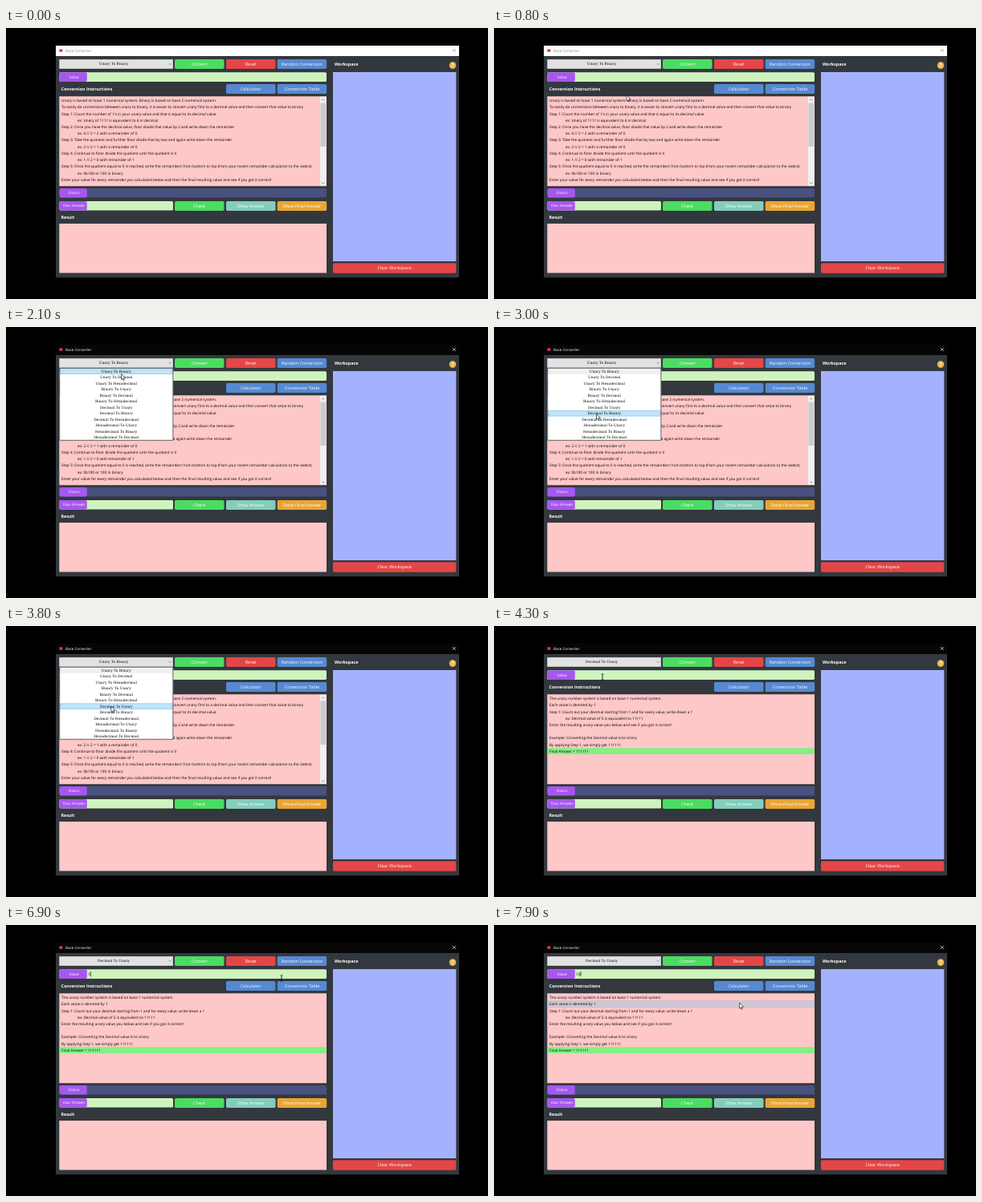
An HTML page with a canvas for the animation above (8000 ms loop, 600x338 px).

```html
<!DOCTYPE html>
<html lang="en">
<head>
<meta charset="utf-8">
<title>Base Converter</title>
<style>
html, body { margin: 0; width: 100%; height: 100%; overflow: hidden; background: #000; }
canvas { display: block; width: 600px; height: 338px; }
</style>
</head>
<body>
<canvas id="stage" width="600" height="338"></canvas>
<script>
const ctx = document.getElementById('stage').getContext('2d');
const LOOP = 8000, STEP = 100;
const SANS = '"Open Sans", "Noto Sans", sans-serif';
const SLAB = '"DejaVu Serif", "Noto Serif", serif';
const PINK = '#ffc8c8', LIME = '#cff3be', PURPLE = '#a757f0', GREEN = '#4bdc62',
      RED = '#e44647', BLUE = '#5789d2', TEAL = '#83cdbb', ORANGE = '#e9a634';

const ROW = 8.22, LIST_TOP = 86.4;
const ITEM = 7.5, MENU_TOP = 51.4;

// Times of the events, in ms
const OPEN = 1700, PICK = 3900, FOCUS = 4600, KEY1 = 6700, KEY2 = 7500;

const bases = ['Unary', 'Binary', 'Decimal', 'Hexadecimal'];
const items = bases.flatMap(a => bases.filter(b => b !== a).map(b => `${a} To ${b}`));

// A leading ">" marks an indented line, a leading "=" the highlighted one
const unaryToBinary = [
  'Unary is based on base 1 numerical system. Binary is based on base 2 numerical system.',
  'To easily do conversions between unary to binary, it is easier to convert unary first to a decimal value and then convert that value to binary',
  "Step 1: Count the number of 1's in your unary value and that is equal to its decimal value",
  '>ex: Unary of 1111 is equivalent to 4 in decimal',
  'Step 2: Once you have the decimal value, floor divide that value by 2 and write down the remainder',
  '>ex: 4 // 2 = 2 with a remainder of 0',
  'Step 3: Take the quotient and further floor divide that by two and again write down the remainder',
  '>ex: 2 // 2 = 1 with a remainder of 0',
  'Step 4: Continue to floor divide the quotient until the quotient is 0',
  '>ex: 1 // 2 = 0 with remainder of 1',
  'Step 5: Once the quotient equal to 0 is reached, write the remainders from bottom to top (from your recent remainder calculation to the oldest)',
  '>ex: 0b100 or 100 in binary',
  'Enter your value for every remainder you calculated below and then the final resulting value and see if you got it correct!'
];
const decimalToUnary = [
  'The unary number system is based on base 1 numerical system.',
  'Each value is denoted by 1',
  'Step 1: Count out your decimal starting from 1 and for every value, write down a 1',
  '>ex: Decimal value of 5 is equivalent to 11111',
  'Enter the resulting unary value you below and see if you got it correct!',
  '',
  'Example: Converting the Decimal value 6 to Unary',
  'By applying Step 1, we simply get 111111',
  '=Final Answer = 111111'
];

// Pointer path: time, x, y
const path = [
  [100, 230, 346], [900, 162, 72], [1300, 150, 59], [1600, 142, 46], [1800, 142, 47],
  [2100, 143.5, 58.5], [2500, 140, 68], [3000, 127.5, 108.5], [3600, 131, 101],
  [3900, 131, 100], [4300, 135, 63.5], [5000, 137, 61], [5800, 215, 57],
  [6700, 335, 65], [6900, 343, 66.5], [7600, 306, 97], [7900, 305.5, 97]
];

function pointer(t) {
  if (t <= path[0][0]) return path[0].slice(1);
  const i = path.findIndex(p => p[0] >= t);
  if (i < 0) return path[path.length - 1].slice(1);
  const [t0, x0, y0] = path[i - 1], [t1, x1, y1] = path[i];
  const u = (t - t0) / (t1 - t0), e = u * u * (3 - 2 * u);
  return [x0 + (x1 - x0) * e, y0 + (y1 - y0) * e];
}

function box(x, y, w, h, fill, r = 0) {
  ctx.fillStyle = fill;
  ctx.beginPath();
  ctx.roundRect(x, y, w, h, r);
  ctx.fill();
}

function outline(x, y, w, h, color, width = 0.6) {
  ctx.strokeStyle = color;
  ctx.lineWidth = width;
  ctx.strokeRect(x, y, w, h);
}

function line(points, color, width) {
  ctx.strokeStyle = color;
  ctx.lineWidth = width;
  ctx.beginPath();
  points.forEach(([x, y], i) => i ? ctx.lineTo(x, y) : ctx.moveTo(x, y));
  ctx.stroke();
}

function shape(points, fill) {
  ctx.fillStyle = fill;
  ctx.beginPath();
  points.forEach(([x, y]) => ctx.lineTo(x, y));
  ctx.closePath();
  ctx.fill();
}

// y is the middle of the x-height band; drawing at 10x keeps tiny advances exact
function text(s, x, y, { size = 4.68, color = '#000', align = 'left', weight = 400, font = SANS } = {}) {
  ctx.save();
  ctx.translate(x, y + size * 0.34);
  ctx.scale(0.1, 0.1);
  ctx.font = `${weight} ${size * 10}px ${font}`;
  ctx.textRendering = 'geometricPrecision';
  ctx.textAlign = align;
  ctx.fillStyle = color;
  ctx.fillText(s, 0, 0);
  ctx.restore();
}

function button(s, x, y, w, fill, h = 12) {
  box(x, y, w, h, fill, 1.8);
  text(s, x + w / 2, y + h / 2, { size: 5.45, color: '#fff', align: 'center' });
}

function field(label, y, w, fill) {
  box(66.5, y, w, 11.6, fill, 1.5);
  box(66.5, y, 34.3, 11.6, PURPLE, 2);
  text(label, 84.5, y + 5.8, { size: 4.75, color: '#fff', align: 'center' });
}

function heading(s, x, y) {
  text(s, x, y, { size: 5.35, color: '#fff', weight: 700 });
}

function titleBar(active) {
  const ink = active ? '#fff' : '#8c8c8c';
  box(62, 22, 502, 13, active ? '#060607' : '#fff');
  box(66.3, 26.4, 4, 3.4, '#d8394a');
  text('Base Converter', 74, 28.2, { size: 4.55, color: ink });
  line([[555.9, 26.1], [559.7, 29.9]], ink, 0.7);
  line([[559.7, 26.1], [555.9, 29.9]], ink, 0.7);
}

function combo(label) {
  box(66.3, 39, 141.7, 12, '#e2e2e2');
  outline(66.6, 39.3, 141.1, 11.4, '#b4b4b4');
  text(label, 134, 44.9, { size: 4.4, align: 'center', font: SLAB });
  line([[202.8, 44.2], [204.2, 45.6], [205.6, 44.2]], '#555', 0.6);
}

function list(lines, hover) {
  box(66.3, 85.3, 332.7, 112, PINK);
  lines.forEach((s, i) => {
    const y = LIST_TOP + i * ROW;
    const mark = s[0];
    if (mark === '=') box(66.8, y, 331.8, ROW - 0.3, '#83f083');
    if (i === hover) {
      box(66.8, y, 331.8, ROW, '#d5c5d0');
      outline(67, y + 0.2, 331.4, ROW - 0.4, '#9fc3de');
    }
    text(s.replace(/^[>=]/, ''), mark === '>' ? 89 : 69, y + ROW / 2);
  });
}

function scrollBar() {
  box(391, 85.8, 7.6, 111, '#f0f0f0');
  box(391.4, 93.5, 6.8, 54.5, '#cbcbcb');
  line([[393.3, 90.3], [394.8, 88.8], [396.3, 90.3]], '#606060', 0.7);
  line([[393.3, 192.8], [394.8, 194.3], [396.3, 192.8]], '#606060', 0.7);
}

function menu(hover) {
  box(66.5, 51, 141.7, 90.4, '#fff');
  items.forEach((s, i) => {
    const y = MENU_TOP + i * ITEM;
    if (i === 0) box(67, y, 140.7, ITEM, '#f0f0f0');
    if (i === hover) {
      box(67, y, 140.7, ITEM, '#c0e3f8');
      ctx.setLineDash([1, 1]);
      outline(67.4, y + 0.4, 140, ITEM - 0.8, '#5a9cc6');
      ctx.setLineDash([]);
    }
    text(s, 137.2, y + ITEM / 2, { size: 4.45, align: 'center', font: SLAB });
  });
  outline(66.8, 51.2, 141.1, 90, '#222', 0.7);
}

function valueText(t) {
  if (t < FOCUS) return;
  const s = t >= KEY2 ? '10' : t >= KEY1 ? '1' : '';
  const since = t >= KEY2 ? KEY2 : t >= KEY1 ? KEY1 : FOCUS;
  text(s, 102, 61.2);
  if ((t - since) % 1060 < 530) box(102.2 + s.length * 2.68, 58, 0.7, 6.2, '#000');
}

function help() {
  ctx.fillStyle = '#e9b64a';
  ctx.beginPath();
  ctx.arc(556, 46.6, 4.3, 0, 7);
  ctx.fill();
  text('?', 556, 46.7, { size: 6.6, color: '#fff', align: 'center', weight: 700 });
}

function arrow(x, y) {
  const pts = [[0, 0], [0, 7.2], [1.6, 5.7], [2.7, 8.2], [3.8, 7.7], [2.8, 5.3], [5, 5.2]]
    .map(([a, b]) => [x + a, y + b]);
  shape(pts, '#fff');
  line([...pts, pts[0]], '#000', 0.6);
}

function beam(x, y) {
  line([[x, y - 3.6], [x, y + 3.6]], '#000', 0.8);
  line([[x - 1.5, y - 3.6], [x + 1.5, y - 3.6]], '#000', 0.6);
  line([[x - 1.5, y + 3.6], [x + 1.5, y + 3.6]], '#000', 0.6);
}

function draw(t) {
  const [px, py] = pointer(t);
  const open = t >= OPEN && t < PICK;
  const picked = t >= PICK;
  const inList = !open && px > 66 && px < 391 && py > LIST_TOP && py < 197;

  box(0, 0, 600, 338, '#000');
  box(62, 22, 502, 289.3, '#33383e');
  titleBar(t >= OPEN);

  combo(picked ? 'Decimal To Unary' : items[0]);
  button('Convert', 210, 39, 61.5, GREEN);
  button('Reset', 274, 39, 61.5, RED);
  button('Random Conversion', 337.7, 39, 61.5, BLUE);

  field('Value', 55.3, 332.5, LIME);
  valueText(t);

  heading('Conversion Instructions', 68.5, 76);
  button('Calculator', 274, 70, 61.5, BLUE);
  button('Conversion Table', 337.7, 70, 61.5, BLUE);

  list(picked ? decimalToUnary : unaryToBinary, inList ? Math.floor((py - LIST_TOP) / ROW) : -1);
  if (!picked) scrollBar();

  field('Status', 200, 332.5, '#48517f');
  field('Your Answer', 216, 141.5, LIME);
  button('Check', 210, 216, 61.5, GREEN);
  button('Show Answer', 274, 216, 61.5, TEAL);
  button('Show Final Answer', 337.7, 216, 61.5, ORANGE);

  heading('Result', 68.5, 236);
  box(66.3, 244, 332.7, 61.5, PINK);

  heading('Workspace', 409, 45);
  help();
  box(407, 55, 153.3, 236, '#a4b2fd');
  button('Clear Workspace', 407, 293.3, 153.3, RED, 12.4);

  if (open) menu(Math.floor((py - MENU_TOP) / ITEM));

  const inField = !open && px > 101 && px < 399 && py > 55 && py < 67.5;
  (inField ? beam : arrow)(px, py);
}

function tick(now) {
  const t = now % LOOP;
  draw(Math.floor(t / STEP) * STEP);
  requestAnimationFrame(tick);
}
draw(0);
requestAnimationFrame(tick);
</script>
</body>
</html>
```
